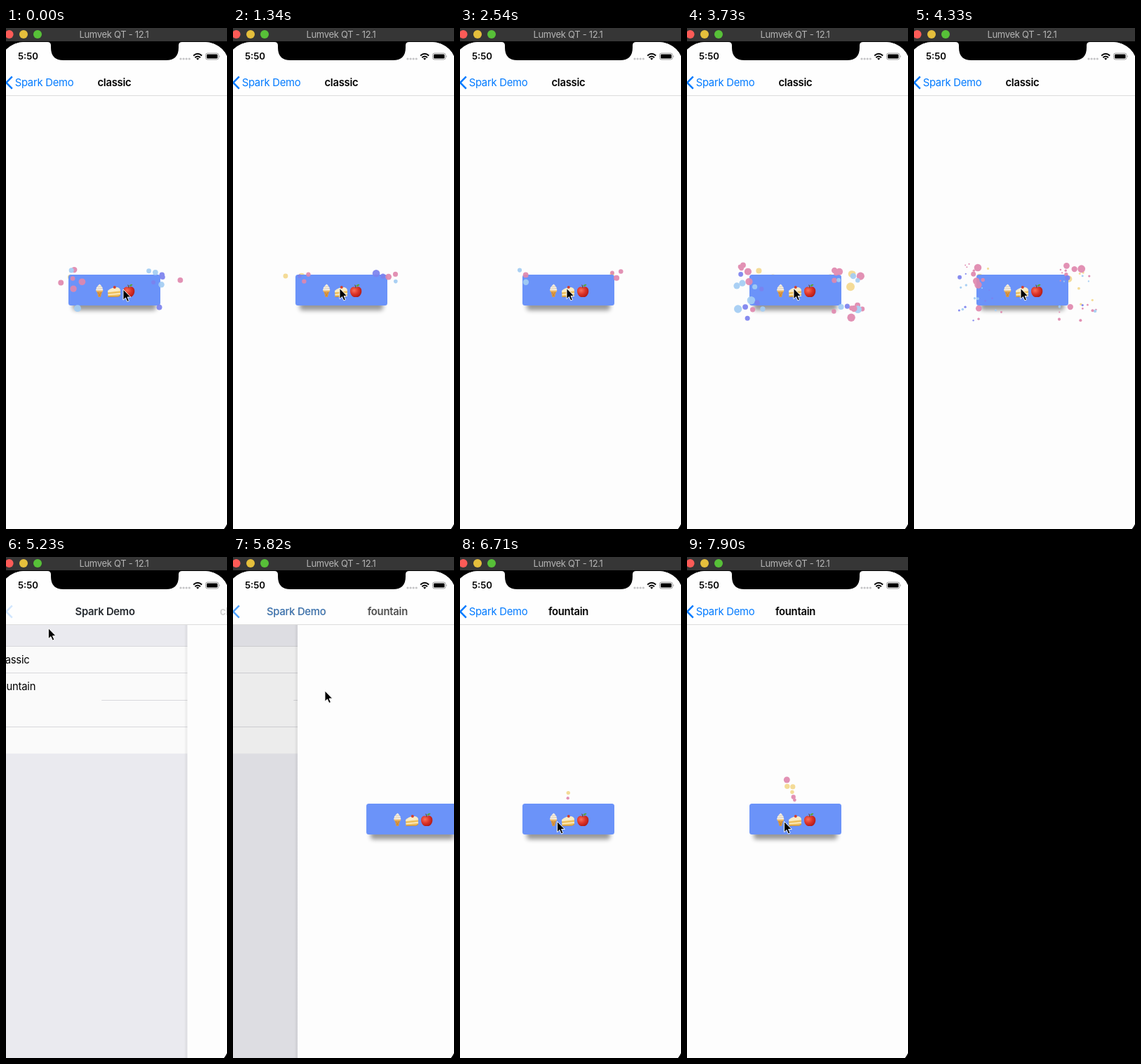
These frames come from a looping animation (315 by 715 pixels, 8000 ms). An HTML page:

```html
<!DOCTYPE html>
<html lang="en">
<head>
<meta charset="utf-8">
<title>Particle buttons</title>
<style>
  html, body { margin: 0; width: 100%; height: 100%; overflow: hidden; background: #000; }
  svg { display: block; width: 100vw; height: 100vh; }
  text { font-family: Inter, Roboto, sans-serif; }
  .nav { font-size: 14.8px; letter-spacing: -.25px; }
  .mid { text-anchor: middle; }
  .bold { font-weight: 600; }
  .blue { fill: #007aff; }
  .rule { stroke: #d4d4d8; stroke-width: .8; }
</style>
</head>
<body>
<svg viewBox="0 0 315 715">
  <defs>
    <clipPath id="screen"><rect x="-9" y="20" width="327" height="708" rx="34.5"/></clipPath>
    <filter id="blur" x="-20%" y="-60%" width="140%" height="220%"><feGaussianBlur stdDeviation="3.2"/></filter>
    <linearGradient id="edge"><stop offset="0" stop-opacity=".02"/><stop offset="1" stop-opacity=".07"/></linearGradient>
    <radialGradient id="skin" cx=".35" cy=".35" r=".75">
      <stop offset="0" stop-color="#f8705c"/><stop offset=".5" stop-color="#dd3428"/><stop offset="1" stop-color="#a81716"/>
    </radialGradient>
  </defs>
  <rect width="315" height="715"/>

  <g clip-path="url(#screen)">
    <rect x="-9" y="20" width="327" height="708" fill="#fefefe"/>

    <g id="list">
      <rect x="-9" y="97" width="430" height="631" fill="#efeff4"/>
      <rect x="-9" y="127" width="327" height="153.5" fill="#fff"/>
      <path class="rule" d="M-9 127.5H318M-9 165.5H318M154 204.5H318M-9 242.5H318"/>
      <text class="nav" x="5" y="151.5">classic</text>
      <text class="nav" x="5" y="190">fountain</text>
    </g>
    <rect id="dim" x="-9" y="97" width="327" height="631"/>

    <g id="detail">
      <rect x="-13" y="97" width="4" height="631" fill="url(#edge)"/>
      <rect x="-9" y="97" width="327" height="631" fill="#fdfdfd"/>
      <rect x="95" y="365" width="119" height="38" rx="4" opacity=".4" filter="url(#blur)"/>
      <g id="under" opacity=".92"></g>
      <rect x="89" y="352" width="131" height="44" rx="3.5" fill="#6b93f9"/>
      <!-- ice cream -->
      <path d="M129.2 375H137.4L134.9 384H131.7Z" fill="#dc9a45"/>
      <path d="M130.8 377L134.6 383M135.8 377L132 383" stroke="#b9772c" stroke-width=".6"/>
      <rect x="128.4" y="374" width="9.8" height="2.6" rx="1" fill="#f0b964"/>
      <path d="M133.2 365.4C135.6 366.6 136.2 367.8 135.8 368.8C137.8 369.6 138 371 137.3 371.9C138.9 372.8 138.5 374.6 137 374.6H129.4C127.8 374.6 127.5 372.8 129.1 371.9C128.3 371 128.8 369.8 130.5 369C130.3 367.4 132.2 367.2 133.2 365.4Z" fill="#f6eee0"/>
      <path d="M130.7 369.4L135.8 368.6M129.4 372.2L137.1 371.5" stroke="#d2c3ab" stroke-width=".8"/>
      <!-- cake -->
      <path d="M145 375.5L163 374.6V381.8L160 383.6 145.6 384Z" fill="#eec15f"/>
      <path d="M145 375C148.5 371.6 153 370 158.5 370C161.5 370.6 163.2 372.6 163 375.2L145.2 377.2Z" fill="#faecc6"/>
      <path d="M145.4 380.6L163 379" stroke="#fff3d6" stroke-width="1.3"/>
      <path d="M145.5 383.6L160 383.2 163 381.5" stroke="#c4893a" fill="none"/>
      <circle cx="154.8" cy="370" r="2" fill="#d2402f"/>
      <!-- apple -->
      <path d="M175 370.2C178 368.2 183.2 369.6 183.3 375.4C183.3 380.6 179.5 384.8 175.2 383.9C170.8 384.8 167 380.6 167 375.4C167 369.8 172 368.2 175 370.2Z" fill="url(#skin)"/>
      <path d="M175 371C174.8 369 174.6 367.6 173.6 366.5" stroke="#71401e" stroke-width="1.1" fill="none"/>
      <path d="M175.2 368.5C176 366 178.3 365.4 180.4 366C179.7 368.2 177.7 369.2 175.2 368.5Z" fill="#5ca437"/>
      <g id="over" opacity=".92"></g>
    </g>

    <rect x="-9" y="20" width="327" height="76.5" fill="#fefefe"/>
    <path d="M-9 96.5H318" stroke="#dcdcdc"/>
    <g id="press">
      <path id="chevron" d="M8.8 69.4L.2 78 8.8 86.6" fill="none" stroke="#007aff" stroke-width="2.5"/>
      <text id="backBlue" class="nav mid blue" y="83">Spark Demo</text>
    </g>
    <text id="backBold" class="nav mid bold" y="83">Spark Demo</text>
    <text id="title" class="nav mid bold" y="83"></text>

    <text class="bold" x="17" y="45" font-size="13.2">5:50</text>
    <path d="M249 44H262" stroke="#c4c4c6" stroke-width="3.2" stroke-linecap="round" stroke-dasharray="0 4.1"/>
    <path d="M267.2 39.6Q273.2 34 279.2 39.6M269.4 42.2Q273.2 38.7 277 42.2" fill="none" stroke="#000" stroke-width="2"/>
    <path d="M271.1 43.6Q273.2 41.9 275.3 43.6L273.2 45.8Z"/>
    <rect x="284.5" y="36" width="18.5" height="9" rx="2.6" fill="none" stroke="#9b9b9b"/>
    <rect x="286" y="37.5" width="15.5" height="6" rx="1.3"/>
    <path d="M304.2 39Q306 40.5 304.2 42Z" fill="#9b9b9b"/>
    <path d="M59 19V20Q64 20 64 25V28Q64 46 82 46H228Q246 46 246 28V25Q246 20 251 20V19Z"/>
  </g>

  <rect width="315" height="19" fill="#363636"/>
  <circle cx="4.6" cy="9" r="6" fill="#fc5b57"/>
  <circle cx="25" cy="9" r="6" fill="#e5bf3c"/>
  <circle cx="45" cy="9" r="6" fill="#57c038"/>
  <text class="mid" x="154" y="14" font-size="13" letter-spacing="-.3" fill="#b4b4b4">Lumvek QT - 12.1</text>

  <g id="cursor">
    <path transform="scale(.95)" d="M0 0V16L3.7 12.6 6.2 18.4 8.9 17.2 6.4 11.6H11.3Z" stroke="#fff"/>
  </g>
</svg>

<script>
const LOOP = 8000, STEP = 149.05;
const COLORS = ['#e088ae', '#f4d98f', '#a3cdf3', '#7c82ee']; // pink, yellow, sky, indigo
const YELLOW = 1;
const $ = id => document.getElementById(id);
const clamp = v => Math.min(1, Math.max(0, v));
const ease = v => 1 - (1 - clamp(v)) ** 3;

let seed = 7;
function rand(lo = 0, hi = 1) {
  seed = (seed * 1664525 + 1013904223) % 4294967296;
  return lo + (hi - lo) * seed / 4294967296;
}
const pickColor = () => Math.floor(rand(0, 5)) % 4; // pink twice as often

const parts = [];

// One tap: dots fly out around the four corners, the top ones first.
function burst(start) {
  const count = 48;
  const reach = u => .85 * (1 - (1 - u) ** 12) + .15 * u;
  const size = u => (.75 + Math.min(.25, u)) * (1 - u * u);
  for (let i = 0; i < count; i++) {
    const right = i % 2, low = (i >> 1) % 2;
    const angle = rand(0, 2 * Math.PI), far = rand(.35, 1);
    parts.push({
      born: start + 300 * (i / count) ** (2 / 3) + 140 * low, end: start + 1150,
      x: right ? 222 : 94, y: low ? 398 : 355,
      dx: 40 * far * Math.cos(angle), dy: 23 * far * Math.sin(angle),
      r: rand(3.2, 6.5), color: pickColor(), reach, size
    });
  }
}

// A stream of dots rising from the top edge of the button.
function jet(start) {
  const reach = u => 1 - (1 - u) ** 2.4;
  const size = u => Math.min(1, .3 + u * 4) * (1 - u ** 3);
  for (let i = 0; i < 24; i++) {
    const born = start + i * 20;
    parts.push({
      born, end: born + 660, x: 154, y: 350,
      dx: rand(-34, 27) + rand(-28, 22), dy: -rand(55, 110),
      r: rand(3.5, 7), color: pickColor(), reach, size
    });
  }
}

[-200, 1190, 2390, 3330, 4130].forEach(burst);
[6670, 7790].forEach(jet);

// Cursor moves: start, end, x, y
const MOVES = [[0, 0, 167, 373], [300, 900, 152, 371.5], [4350, 4800, 37, 72],
  [5080, 5500, 131, 191], [5880, 6400, 138.5, 377.5]];

function cursorAt(t) {
  let x = 0, y = 0;
  for (const [from, to, tx, ty] of MOVES) {
    const v = to > from ? clamp((t - from) / (to - from)) : 1, s = v * v * (3 - 2 * v);
    x += (tx - x) * s;
    y += (ty - y) * s;
  }
  return [x, y];
}

function drawParts(t) {
  let under = '', over = '';
  for (const p of parts) {
    if (t <= p.born || t >= p.end) continue;
    const u = (t - p.born) / (p.end - p.born), k = p.reach(u);
    const dot = `<circle cx="${p.x + p.dx * k}" cy="${p.y + p.dy * k}" r="${p.r * p.size(u)}" fill="${COLORS[p.color]}"/>`;
    if (p.color === YELLOW && t < 6000) under += dot; else over += dot;
  }
  $('under').innerHTML = under;
  $('over').innerHTML = over;
}

// p = 1 shows the detail page, p = 0 the list.
function drawPages(t) {
  const first = t < 5580;
  const p = first ? 1 - ease((t - 5000) / 500) : ease((t - 5651) / 500);
  const shift = (id, x) => $(id).setAttribute('transform', `translate(${x} 0)`);
  const fade = (id, a) => $(id).setAttribute('opacity', a);
  const label = 154 - 99.5 * p ** 1.2;
  shift('list', -98 * p);
  shift('detail', 327 * (1 - p));
  shift('backBlue', label);
  shift('backBold', label);
  shift('title', 154.5 + 213 * (1 - p));
  fade('dim', .075 * Math.min(1, p * 1.4));
  fade('backBlue', p);
  fade('backBold', 1 - p);
  fade('chevron', p);
  fade('title', p);
  fade('press', t > 4860 && t < 5000 ? .22 : 1);
  $('title').textContent = first ? 'classic' : 'fountain';
}

let shown = -1;
const start = performance.now();
function tick() {
  const step = Math.floor((performance.now() - start) % LOOP / STEP + .065);
  if (step !== shown) {
    shown = step;
    const t = step * STEP;
    drawPages(t);
    drawParts(t);
    $('cursor').setAttribute('transform', `translate(${cursorAt(t)})`);
  }
  requestAnimationFrame(tick);
}
tick();
</script>
</body>
</html>
```
